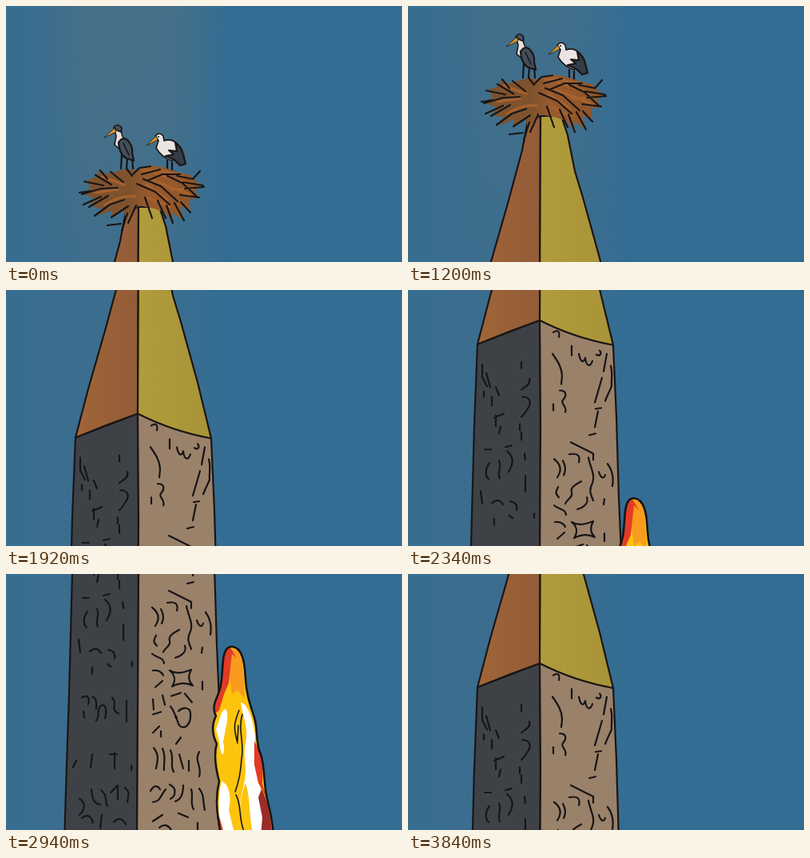
These frames come from a looping animation (496x321 px, 3900 ms). An HTML page:

```html
<!DOCTYPE html>
<html lang="en">
<head>
<meta charset="utf-8">
<title>Storks on an obelisk</title>
<style>
html, body { margin: 0; width: 100%; height: 100%; overflow: hidden; background: #336d94; }
svg { display: block; width: 496px; height: 321px; }
.ink { fill: none; stroke: #171516; stroke-width: 2.2; stroke-linecap: round; stroke-linejoin: round; }
.edge { stroke: #1b1514; stroke-width: 2.2; stroke-linejoin: round; }
.thin { stroke-width: 1.6; }
.beak { fill: #dc962e; stroke-width: .8; }
</style>
</head>
<body>
<svg viewBox="0 0 496 321">
  <defs>
    <linearGradient id="sky">
      <stop offset="0" stop-color="#386d8f"/>
      <stop offset=".12" stop-color="#3a6d8f"/>
      <stop offset=".45" stop-color="#386d91"/>
      <stop offset=".58" stop-color="#336d94"/>
      <stop offset="1" stop-color="#336d94"/>
    </linearGradient>
    <linearGradient id="haze">
      <stop offset="0" stop-color="#4a7187" stop-opacity="0"/>
      <stop offset=".25" stop-color="#4a7187" stop-opacity=".8"/>
      <stop offset=".68" stop-color="#4a7187" stop-opacity=".75"/>
      <stop offset="1" stop-color="#4a7187" stop-opacity="0"/>
    </linearGradient>
    <linearGradient id="fade" x2="0" y2="1">
      <stop offset="0" stop-color="#fff"/>
      <stop offset=".5" stop-color="#ddd"/>
      <stop offset="1" stop-color="#666"/>
    </linearGradient>
    <mask id="down"><rect width="496" height="321" fill="url(#fade)"/></mask>
    <linearGradient id="copper">
      <stop offset="0" stop-color="#a06538"/>
      <stop offset="1" stop-color="#925c38"/>
    </linearGradient>
    <linearGradient id="gold">
      <stop offset="0" stop-color="#b09c3a"/>
      <stop offset="1" stop-color="#a89438"/>
    </linearGradient>
    <linearGradient id="straw">
      <stop offset="0" stop-color="#7c5330"/>
      <stop offset=".4" stop-color="#80522c"/>
      <stop offset=".55" stop-color="#985a2c"/>
      <stop offset="1" stop-color="#8c5429"/>
    </linearGradient>
  </defs>

  <rect width="496" height="321" fill="url(#sky)"/>
  <rect id="glow" x="40" width="240" height="321" fill="url(#haze)" mask="url(#down)"/>

  <g id="world">
    <!-- shaft -->
    <path class="edge" fill="#3e4247" d="M87 499L165 469L166 601L164 940H73L76 840L79 752L83 600Z"/>
    <path class="edge" fill="#9a816a" d="M165 469L257 500L261 590L264 690L267 760L270 940H164L166 601Z"/>
    <!-- cap -->
    <path class="edge" fill="url(#copper)" d="M150 258L143 295L124 365L103 438L87 499L127 483L165 469L166 252Z"/>
    <path class="edge" fill="url(#gold)" d="M166 252L165 469Q208 491 257 500L240 430L219 354L209 321L200 276L192 252Z"/>

    <!-- upper carvings -->
    <g class="ink" transform="translate(0 431)">
      <path d="M182 53q9-5 7 6M205 70v12M214 80c2 11 6 12 8 5c1 10 6 13 9 4M236 81c5 3 7-2 4-5M181 80c7 10 12 18 12 28l-1 10M249 80l-4 22M243 110l-9 31M254 95c3 12 0 18 1 26c-3 7-5 10-8 18M242 148l-7 1M238 152l-4 20M235 180l-8 2"/>
      <path d="M190 126c10 0 8 8 4 12c-4 4 6 8 3 15M182 143v8M204 191l28 14v8M202 206c11-2 14 2 12 10M183 212c8 6 10 14 4 23M194 214c4 7 4 12 1 18M226 210c2 12 9 22 5 32c-5 10-2 14 1 22M239 228c2 7 6 10 8 4M250 218c6 8 8 16 6 28"/>
      <path d="M217 240c-8 4-14 8-12 14c2 6-6 8-8 14M188 247c-3 6-4 8 1 13M183 270c7 6 14 4 15 12M224 260c3 8-5 13-12 15M246 262l-1 7M205 291c8 5 16 3 27-1c-5 9-3 15 2 20c-8-4-16-4-26 1c5-8 4-14-3-20M184 291c7-1 11 2 13 6M187 312l9-8M246 305v10"/>
      <path d="M93 93v16l6 12M98 104l5 18M142 90v8M95 127v7M110 122l4 10M152 111c2 8-6 10-10 14M143 134c9 0 12 6 8 13c-4 6-6 10-9 12M105 134v11M108 160l12-5M110 157v14M116 171l-2 9M140 168v8M142 178v10M96 200h8M122 197l8-2M146 205l1 8"/>
      <path d="M102 217c-7 9-4 18-1 20M114 214c4 8-3 16 1 22M124 202c10 8 7 18 2 26M147 233v20M93 268l-2-16M105 267q9-7 14 2M128 265q10 2 8 11M158 280v6M108 287v8M127 283l4 3"/>
    </g>
    <!-- lower carvings -->
    <g class="ink" transform="translate(0 601)">
      <path d="M184 157l1 13M196 152l3 12M207 153l12-4M224 150l9 11M184 176l10-3M216 172c6-6 15-5 15 3c1 10-4 18-10 17c-7-1-5-10-9-13M206 166c5 6 4 9 8 14M184 199l8-8M194 197v7M213 213l6-8M185 218c8 10 4 18 3 26M196 219c5 11 1 18 2 27M206 221c5 10-1 20 4 27M217 226l5 18M229 234v13M242 223c-7 12 4 17 0 31"/>
      <path d="M181 272c4-7 8-8 12-2M184 286c10-1 9-8 16-16M205 264c10 5 7 15 1 18M212 285q10-3 10-20M232 270c3 8-2 18 3 25M242 269c7 9 4 15 7 27M184 310l12-8M192 318c7-6 12-2 15 3M216 300l12 5M240 312v9"/>
      <path d="M95 155c8-5 10 2 8 8M108 154q6 0 5 15M97 172l1 8M113 184c6-8-1-13 6-19c5-3 8 4 5 16M133 155c8 8-4 14 8 20M151 159v26M84 242l4-8M108 226l-2 17M136 224v20M130 226h9M157 240v6M92 282c8 4 7 14 0 20M107 270c1 12 3 18 11 19M119 271c9 7 4 13 8 20M131 274l9-9v17M149 268c7 6 4 10 3 18M95 306q10-8 14 6M120 302l-2 17M135 311q9-9 15 3"/>
    </g>

    <!-- flame -->
    <g transform="translate(0 601)">
      <path id="body" fill="#fdc40d" d="M283 91C276 91 273 98 272 108C270 128 271 140 264 155C259 166 260 173 263 178C257 190 259 203 264 213C260 226 262 241 267 260C262 280 264 299 268 321V340H336Q335 313 328 286C322 265 325 244 319 226C312 212 316 196 311 180C306 164 301 151 300 132C299 110 296 92 283 91Z"/>
      <path fill="#f99b1e" d="M283 93C297 93 297 113 298 137L299 156L290 146L283 151L280 128Z"/>
      <path fill="#e33b26" d="M281 92C275 94 273 99 272 109C270 132 271 140 263 158L261 176L267 171L273 151L279 137L283 100L289 106Z"/>
      <path fill="#fff" d="M270 174C277 162 279 177 276 190L272 210C276 226 269 236 267 209L263 195ZM294 161C303 163 309 181 312 202C311 230 320 260 320 287L324 325H300C293 300 291 290 297 268C304 241 296 232 300 212C304 192 297 181 294 161ZM270 260C279 263 283 279 279 296L286 325H269C266 300 265 284 270 260Z"/>
      <path fill="#fdc40d" d="M300 262C306 279 304 300 309 325H295C293 304 291 285 300 262Z"/>
      <path fill="#e23a27" d="M311 210C318 220 323 241 321 263L326 280L316 262L311 239ZM266 300L273 325H267Z"/>
      <path fill="#9b2c2a" d="M320 270Q330 286 334 332H319L321 305L316 280Z"/>
      <path class="ink thin" d="M292 171C285 188 285 193 290 212M296 176C290 195 299 212 295 232C294 249 292 260 287 273M291 190l-1 19M288 277C295 288 291 304 298 323"/>
      <path class="ink" style="stroke-width:2.6" d="M283 91C276 91 273 98 272 108C270 128 271 140 264 155C259 166 260 173 263 178C257 190 259 203 264 213C260 226 262 241 267 260C262 280 264 299 268 321V340H336Q335 313 328 286C322 265 325 244 319 226C312 212 316 196 311 180C306 164 301 151 300 132C299 110 296 92 283 91Z"/>
    </g>

    <!-- stork legs -->
    <path class="ink" d="M145 187l-1 17M152 190l-1 14M158 191l1 13M202 194v14M208 196v11"/>

    <!-- nest -->
    <path fill="url(#straw)" d="M101 219L113 214L117 206L126 211L137 208L151 204L163 206L177 200L196 202L214 208L231 212L238 220L246 225L236 232L243 240L229 243L231 256L219 251L222 268L208 259L209 271L198 258L186 254L166 250L150 266L147 255L131 265L133 256L116 263L119 254L105 250L112 242L95 235L106 229Z"/>
    <g fill="none" stroke="#a8622e" stroke-width="3" stroke-linecap="round">
      <path d="M172 206Q194 204 222 214M176 224L203 243M186 209L226 222M183 218L231 237M206 230L234 229M178 240L205 252M120 214L148 224M112 234L140 230M124 249Q146 236 162 239"/>
    </g>
    <path class="ink" d="M95 236L119 229L140 228M92 234L106 232M98 220L122 225M112 212L132 224M118 206L127 217M131 208L147 221M151 204L158 213M97 249L119 239M104 252L128 238M111 263L130 249L148 243M127 275L144 273M132 265L153 251"/>
    <path class="ink" d="M159 211L167 203L181 201M170 211L193 205M177 219L196 211L218 211M164 223L187 233L205 249M172 217L194 226L215 245M202 213L221 222L239 239M214 213L234 217L243 207M222 221L247 225M224 229L248 227M218 237L242 240M219 246L231 259M211 247L223 269M201 250L209 272M190 244L200 266M174 240L183 266M163 250L153 272M152 260L145 282"/>

    <!-- left stork -->
    <path fill="#e4dfdc" class="edge thin" d="M135 153Q140 147 144 152L145 161L149 170L143 180L136 174L138 163Z"/>
    <path fill="#434e5b" class="edge" d="M141 171Q146 163 152 168Q159 175 158 184L160 194L151 191Q142 187 141 171Z"/>
    <path class="ink thin" d="M147 172L154 187"/>
    <path fill="#45525f" class="edge thin" d="M135 152Q140 146 145 153L144 158L139 156Z"/>
    <path class="edge beak" d="M136 153L123 165L138 158Z"/>

    <!-- right stork -->
    <path fill="#eae5e2" class="edge thin" d="M187 163Q192 157 197 163L198 169Q209 165 216 175L218 186L208 194Q195 190 188 178L191 169Z"/>
    <path fill="#343c46" class="edge" d="M212 171Q220 177 222 186L225 198L218 200L211 193L200 188L210 186L204 181L214 182Z"/>
    <path class="edge beak" d="M188 163L176 175L190 168Z"/>
    <circle cx="191" cy="164" r="1" fill="#171516"/>
  </g>
</svg>
<script>
const STEP = 60, LOOP = 3900;
// time in ms, camera drop in px
const path = [[0, 0], [720, 0], [780, 3], [840, 14], [900, 31], [1500, 197],
  [2340, 431], [2940, 601], [3000, 596], [3420, 477], [3840, 357]];

function drop(t) {
  const i = path.findIndex(p => p[0] >= t);
  if (i < 1) return path[0][1];
  const [t0, y0] = path[i - 1], [t1, y1] = path[i];
  return Math.round(y0 + (y1 - y0) * (t - t0) / (t1 - t0));
}

function play(id, pose) {
  const keys = [];
  for (let t = 0; t < LOOP; t += STEP)
    keys.push({ ...pose(drop(t)), offset: t / LOOP, easing: 'steps(1, end)' });
  keys.push({ ...keys[keys.length - 1], offset: 1 });
  document.getElementById(id).animate(keys, { duration: LOOP, iterations: Infinity });
}

play('world', y => ({ transform: `translateY(${-y}px)` }));
play('glow', y => ({ opacity: Math.max(0.15, 1 - y / 300) }));
</script>
</body>
</html>
```
